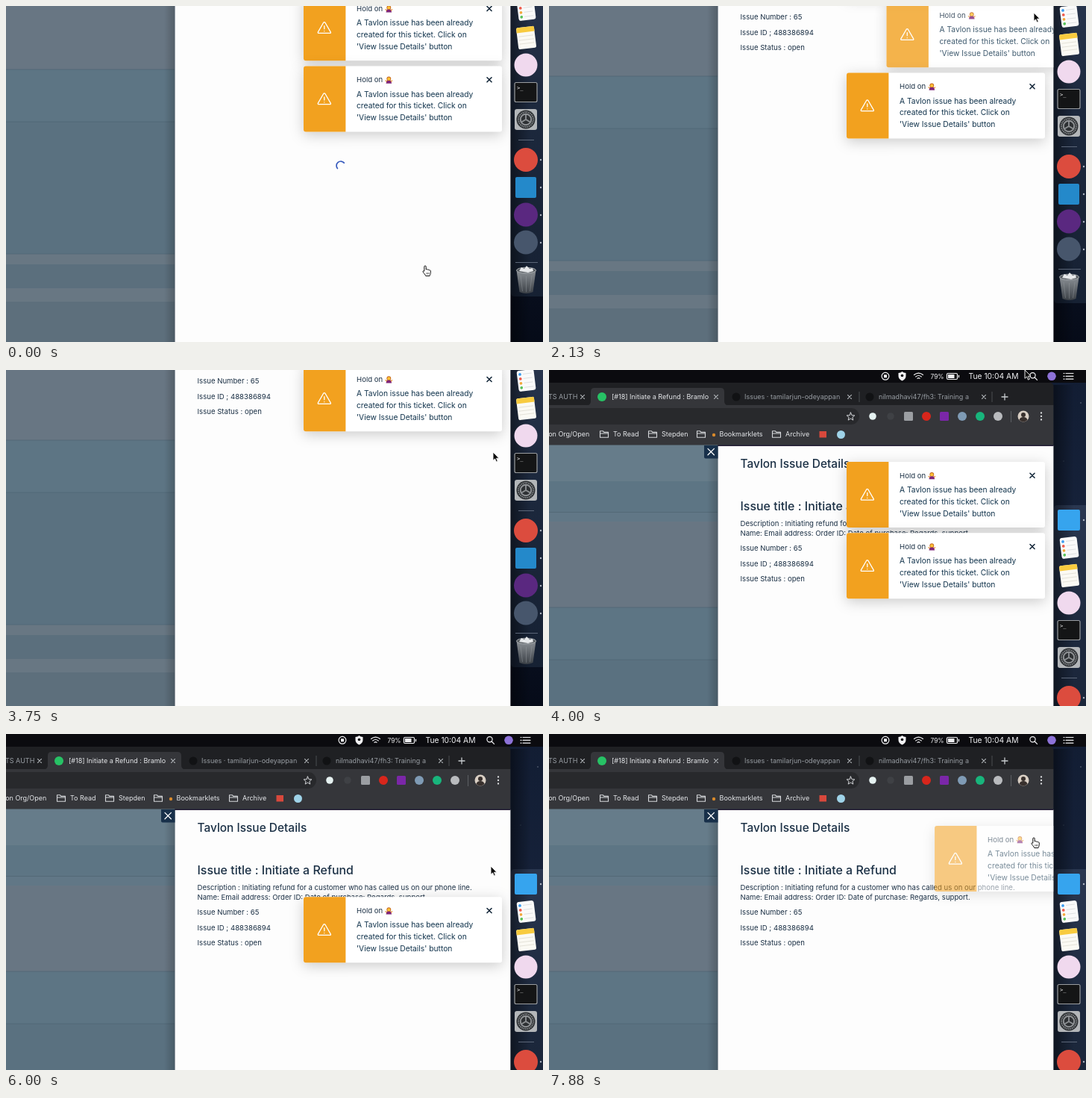
Recreate the animation shown at these times as an HTML page. Size 720 px wide and 450 px high, loop 8 s.

```html
<!DOCTYPE html>
<html lang="en">
<head>
<meta charset="utf-8">
<title>Issue details panel</title>
<style>
html, body { margin: 0; width: 100%; height: 100%; overflow: hidden; background: #060b18; }
svg { display: block; width: 720px; height: 450px; font-family: Inter, "Open Sans", sans-serif; }
text { white-space: pre; }
.body { font-size: 9.6px; fill: #1b3045; }
.note { font-size: 10.28px; fill: #12344d; }
.head { font-weight: 500; fill: #1b3045; }
.ui { font-size: 9px; fill: #e4e6e9; }
.dim { fill: #989da3; }
.line { fill: none; stroke-linecap: round; stroke-linejoin: round; }
.toast { filter: drop-shadow(0 4px 9px rgba(0, 0, 0, .2)); }
</style>
</head>
<body>
<svg viewBox="0 0 720 450">
  <defs>
    <linearGradient id="edge"><stop stop-opacity="0"/><stop offset="1" stop-opacity=".2"/></linearGradient>
    <linearGradient id="shade"><stop stop-opacity=".45"/><stop offset="1" stop-opacity="0"/></linearGradient>
    <linearGradient id="sky" x2="0" y2="1"><stop stop-color="#121d33"/><stop offset=".3" stop-color="#16223a"/><stop offset="1" stop-color="#050a17"/></linearGradient>
    <linearGradient id="dockFill" x2="0" y2="1"><stop stop-color="#2a3750"/><stop offset=".4" stop-color="#1d293e"/><stop offset="1" stop-color="#162133"/></linearGradient>
    <linearGradient id="bin" x2="0" y2="1"><stop stop-color="#8b9095"/><stop offset="1" stop-color="#3b4046"/></linearGradient>
    <clipPath id="page"><path d="M226 102H676.5V700H226z"/></clipPath>

    <path id="x" class="line" d="M-3-3 3 3M3-3-3 3"/>
    <g id="folder" class="line" stroke="#d5d7da" stroke-width="1.1">
      <path d="M-5.5-4.2h4l1.3 1.6h5.7v6.8h-11zM-5.5-1h11"/>
    </g>
    <g id="shrug">
      <circle cy="-1.6" r="2.9" fill="#c2641c"/>
      <circle cy="-1.3" r="2.1" fill="#ffc235"/>
      <path d="M-3 1h6l.8 3.8h-7.6z" fill="#7d2479"/>
      <path class="line" d="M-3 2.2-4.4.8M3 2.2 4.4.8" stroke="#e8952a" stroke-width="1.2"/>
    </g>
    <g id="toast">
      <rect width="266" height="88" rx="3" fill="#fff"/>
      <path d="M3 0H56.4V88H3a3 3 0 0 1-3-3V3a3 3 0 0 1 3-3z" fill="#f2a11f"/>
      <path class="line" d="M26.7 37 19.4 49.6Q18.8 51.2 20.5 51.2H35.1Q36.9 51.2 36.2 49.6L28.9 37Q27.8 35.600 26.7 37zM27.8 41.4v4.2M27.800 48.300v.1" stroke="#fff" stroke-width="1.3"/>
      <text class="body" x="71" y="21.6">Hold on</text>
      <use href="#shrug" x="114.3" y="18.5"/>
      <use href="#x" x="249" y="18.3" stroke="#14283a" stroke-width="1.6"/>
      <g class="note">
        <text x="71" y="41">A Tavlon issue has been already</text>
        <text x="71" y="56.8">created for this ticket. Click on</text>
        <text x="71" y="72.5">'View Issue Details' button</text>
      </g>
    </g>
  </defs>

  <g id="world">
    <!-- desktop -->
    <path d="M0 0H720V700H0z" fill="url(#sky)"/>
    <circle cx="713" cy="44" r=".7" fill="#7e8798"/>
    <circle cx="690" cy="122" r=".5" fill="#5a6478"/>

    <!-- dimmed page -->
    <path d="M0 100H226.500V700H0z" fill="#5d7584"/>
    <path d="M0 100H226V149H0z" fill="#667c8a"/>
    <path d="M0 190H226V203H0z" fill="#617786"/>
    <path d="M0 203H226V318H0z" fill="#687683"/>
    <path d="M0 388H226V565H0z" fill="#5a7180"/>
    <path d="M0 565H226V579H0zM0 611H226V629H0z" fill="#687783"/>
    <path d="M0 579H226V611H0z" fill="#5b6f7d"/>
    <path d="M0 629H226V700H0z" fill="#5d6f7c"/>
    <path d="M0 190.5H226M0 318H226M0 388H226M0 565H226" stroke="#506674" stroke-width=".8"/>
    <path d="M212 101H226.5V700H212z" fill="url(#edge)"/>

    <!-- panel -->
    <path d="M226.5 101H676.5V700H226.5z" fill="#fdfdfd"/>
    <path d="M208 101h18.5v17.5h-16.5a2 2 0 0 1-2-2z" fill="#18304a"/>
    <use href="#x" transform="translate(217.2 109.6) scale(1.4)" stroke="#fff" stroke-width=".9"/>
    <path d="M226 101.3H676.5" stroke="#2b2038" stroke-width="1.2"/>

    <g clip-path="url(#page)">
      <g id="details">
        <text class="head" x="256.5" y="131.3" font-size="15.45">Tavlon Issue Details</text>
        <text class="head" x="256.5" y="188" font-size="15.95">Issue title : Initiate a Refund</text>
        <g class="body">
          <text x="256.5" y="208.6">Description : Initiating refund for a customer who has called us on our phone line.</text>
          <text x="256.5" y="222">Name: Email address: Order ID: Date of purchase: Regards, support.</text>
          <text x="256.5" y="242.4">Issue Number : 65</text>
          <text x="256.5" y="262.6">Issue ID ; 488386894</text>
          <text x="256.5" y="283">Issue Status : open</text>
        </g>
      </g>
      <path id="spinner" class="line" d="M-4.9 3.2A5.7 5.7 0 0 1 4-4.2" stroke="#3559bd" stroke-width="1.7"/>
      <use class="toast" href="#toast"/>
      <use class="toast" href="#toast"/>
      <use class="toast" href="#toast"/>
    </g>

    <!-- browser -->
    <path d="M0 17H671.5a5 5 0 0 1 5 5V48H0z" fill="#1f2023"/>
    <path d="M0 47H676.5V100.5H0z" fill="#35363a"/>
    <path d="M0 51H405a11 11 0 0 1 0 22H0z" fill="#28292c"/>
    <path d="M50 47.5q6 0 6-6V29q0-5 5-5H230q5 0 5 5v12.5q0 6 6 6z" fill="#35363a"/>
    <path d="M416 29V43M594 29V43" stroke="#4a4c50"/>
    <g class="ui">
      <text class="dim" x="-1" y="39.3">TS AUTH</text>
      <text x="84" y="39.3">[#18] Initiate a Refund : Bramlo</text>
      <text class="dim" x="262" y="39.3">Issues · tamilarjun-odeyappan</text>
      <text class="dim" x="442" y="39.3">nilmadhavi47/fh3: Training a</text>
      <text x="-3" y="89.3">lon Org/Open</text>
      <text x="86" y="89.3">To Read</text>
      <text x="151" y="89.3">Stepden</text>
      <text x="228.5" y="89.3">Bookmarklets</text>
      <text x="317" y="89.3">Archive</text>
    </g>
    <circle cx="71" cy="36" r="6" fill="#27c265"/>
    <circle cx="251" cy="36" r="5.5" fill="#111214"/>
    <circle cx="430" cy="36" r="5.5" fill="#111214"/>
    <g id="closers" stroke="#b4b8bc" stroke-width="1.2"></g>
    <path class="line" d="M607 36h8M611 32v8" stroke="#c8cbce" stroke-width="1.3"/>
    <path class="line" d="M404.5 57l1.5 3.600 3.8.3-2.9 2.5.9 3.7-3.3-2-3.3 2 .9-3.7-2.9-2.5 3.8-.3z" stroke="#d5d7da" stroke-width="1"/>
    <g id="addons"></g>
    <path d="M619.5 55V70" stroke="#5d6064"/>
    <circle cx="636" cy="62" r="7.5" fill="#d9cfc4"/>
    <path d="M630.5 67q1-4 5.5-4t5.5 4a7.5 7.5 0 0 1-11 0z" fill="#38302d"/>
    <circle cx="636" cy="60" r="3" fill="#38302d"/>
    <path class="line" d="M660 57.500v.01M660 62v.01M660 66.5v.01" stroke="#e0e2e4" stroke-width="2.3"/>
    <g id="folders"></g>
    <circle cx="221" cy="87" r="2.2" fill="#d98a2b"/>
    <rect x="362.5" y="82" width="9.5" height="8.5" fill="#d8483c"/>
    <circle cx="391.5" cy="86.5" r="5.5" fill="#9fd3e8"/>

    <!-- menu bar -->
    <path d="M0 0H720V17H0z" fill="#0b0b0f"/>
    <g class="line" stroke="#f2f2f4" stroke-width="1.2">
      <circle cx="451" cy="8.3" r="4.9"/>
      <path d="M489.500 6.500q6-4.800 12 0M491.700 9q3.800-3 7.600 0M494 11.300q1.500-1.200 3 0"/>
      <rect x="533.5" y="4.5" width="14" height="8" rx="1.5"/>
      <path d="M549.5 7.3v2.4"/>
      <circle cx="648.5" cy="7.3" r="3.6"/><path d="M651.2 10 654.5 13.3"/>
      <path d="M690 4.5h1M693 4.5h10M690 8.3h1M693 8.3h10M690 12.1h1M693 12.1h10"/>
    </g>
    <rect x="449" y="6.3" width="4" height="4" fill="#f2f2f4"/>
    <path d="M468.5 4q3 0 5-2 2 2 5 2v4q0 4-5 6.5-5-2.5-5-6.5z" fill="#f2f2f4"/>
    <circle cx="473.5" cy="7.5" r="1.8" fill="#0b0b0f"/>
    <path d="M535 6h8.5v5H535z" fill="#f2f2f4"/>
    <circle cx="674" cy="8.3" r="5.8" fill="#8d72d8"/>
    <g fill="#f2f2f4">
      <text x="511.5" y="11.6" font-size="8.4">79%</text>
      <text x="562.5" y="12" font-size="10.3">Tue 10:04 AM</text>
    </g>

    <!-- dock -->
    <path d="M720 181H682q-5 0-5 5V617q0 5 5 5H720z" fill="url(#dockFill)"/>
    <path d="M676.5 20H704V700H676.5z" fill="url(#shade)"/>
    <path d="M687 412.5H708M683 576.5H713" stroke="#5b6678"/>
    <rect x="682" y="187" width="30" height="28" rx="2" fill="#36a4ee"/>
    <g transform="translate(697 237.5) rotate(-7)">
      <rect x="-11" y="-13.5" width="23" height="28" rx="3" fill="#fafafa"/>
      <g id="bullets"></g>
    </g>
    <g transform="translate(697.5 275) rotate(-7)">
      <rect x="-12" y="-14" width="24" height="29" rx="2" fill="#fbfaf4"/>
      <path d="M-12-7v-5q0-2 2-2h20q2 0 2 2v5z" fill="#f8cb3f"/>
      <path d="M-10-2h20M-10 3h20M-10 8h20" stroke="#dcd9ce" stroke-width=".7"/>
    </g>
    <circle cx="697" cy="312" r="15.5" fill="#f0d9ee"/>
    <rect x="682" y="335.5" width="30" height="26" rx="2" fill="#141516" stroke="#9a9da0" stroke-width="1.2"/>
    <text x="685" y="345" font-size="7" fill="#f4f4f4" font-family="'DejaVu Sans Mono', monospace">&gt;_</text>
    <rect x="682" y="371" width="30" height="28" rx="3" fill="#b3b6b9"/>
    <circle cx="697" cy="385" r="12.5" fill="#2e3134"/>
    <g fill="none" stroke="#8f9295">
      <circle cx="697" cy="385" r="10" stroke-width="1.8" stroke-dasharray="1.4 1.1"/>
      <circle cx="697" cy="385" r="7.2" stroke-width="2"/>
      <path d="M697 385V378M697 385l-6 3.5M697 385l6 3.5" stroke-width="1.8"/>
    </g>
    <circle cx="697" cy="439" r="16" fill="#dc4c3e"/>
    <rect x="683" y="462" width="28" height="28" rx="2" fill="#2489ca"/>
    <circle cx="697" cy="512.5" r="16" fill="#5a2880"/>
    <circle cx="697" cy="549.5" r="16" fill="#47566c"/>
    <path d="M684.5 587h26l-4 29q-9 4-18 0z" fill="url(#bin)"/>
    <ellipse cx="697.5" cy="587" rx="13" ry="3.8" fill="#53585d" stroke="#a4a9ad"/>
    <path d="M688 588l3-5 4 2 3-4 4 4 4-1 1 4-7 2z" fill="#e6e8ea"/>
    <path d="M690 594l2.5 21M697.5 595v21M705 594l-2.5 21" stroke="#9a9fa4" stroke-width=".7" opacity=".6"/>
    <g id="running" fill="#aeb5c1"></g>
  </g>

  <g id="cursor" stroke-linejoin="round">
    <path id="arrow" d="M0 0V11.3l2.6-2.4 1.8 4.2 1.9-.8-1.8-4.1h3.5z" fill="#0a0a0a" stroke="#fff" stroke-width=".9"/>
    <g id="hand" stroke="#111">
      <path d="M-1.2 1c0-1.4 2.4-1.4 2.4 0v4c.6-.8 2-.6 2.2.3.7-.6 1.8-.3 2 .6.9-.4 1.9 0 1.9 1.2v2.4c0 2-1 2.6-1.2 4h-5.4c-.4-1.6-2.6-3.6-3.6-5.4-.6-1.2.9-1.9 1.7-.9z" fill="#fff"/>
      <path d="M1.8 9v2.5M3.5 9v2.5M5.2 9v2.5" stroke-width=".6"/>
    </g>
  </g>
</svg>
<script>
const LOOP = 8000, STEP = 125, EXIT = 800;
const TOAST = { x: 399, y: 123, width: 266, pitch: 95.25 };
const $ = id => document.getElementById(id);
const fill = (id, items, draw) => { $(id).innerHTML = items.map(draw).join(''); };

fill('closers', [45, 224, 403, 583], x => `<use href="#x" transform="translate(${x} 36) scale(.85)"/>`);
fill('folders', [74, 139, 204, 305], x => `<use href="#folder" x="${x}" y="86"/>`);
fill('running', [201, 439, 476, 513, 550], y => `<circle cx="717" cy="${y}" r="1.2"/>`);
fill('bullets', ['#3b9cf0', '#ef5b4c', '#f3a83b', '#58c25a'], (color, i) =>
  `<circle cx="-7" cy="${i * 6 - 8.5}" r="1.9" fill="${color}"/>
   <path d="M-3 ${i * 6 - 8.5}H9" stroke="#d4d6d8" stroke-width=".7"/>`);
fill('addons', ['#e6f2f1', '#3f4145', '#9b9ea2', '#d8261c', '#7b27a8', '#7f9bb5', '#18b57c', '#b9bbbe'],
  (color, i) => {
    const x = 434 + i * 24;
    return i === 2 || i === 4
      ? `<rect x="${x - 6}" y="56" width="12" height="12" rx="1.5" fill="${color}"/>`
      : `<circle cx="${x}" cy="62" r="${i < 2 ? 4.8 : 6}" fill="${color}"/>`;
  });

// Each key is [time, ...values].
const scrollKeys = [[875, 233], [1125, 225], [1250, 224], [3750, 224], [4000, 0]];
const cursorKeys = [
  [0, 562, 348], [125, 562, 348], [875, 651, 4], [1125, 651, 0], [1875, 651, 4], [2125, 650, 9],
  [2250, 650, 12], [2625, 650, 103], [3500, 652, 110], [3750, 653, 110], [4000, 638, 0],
  [4500, 638, 0], [5000, 649, 137], [5500, 649, 138], [6000, 650, 177], [6375, 650, 178], [6750, 650, 139]
];
const handTimes = [[0, 250], [875, 2000], [2600, 2800], [5000, 5400], [6750, LOOP]];

// Each toast has [time, slot] places and the time it starts to leave.
const toasts = [
  { places: [[0, 0]], leave: 5270 },
  { places: [[0, 1]], leave: 1999 },
  { places: [[0, 2], [2800, 1], [6100, 0]], leave: 7662 }
];
const toastNodes = document.querySelectorAll('.toast');

function track(keys, t) {
  const next = keys.findIndex(key => key[0] > t);
  if (next < 0) return keys[keys.length - 1].slice(1);
  if (next === 0) return keys[0].slice(1);
  const a = keys[next - 1], b = keys[next], p = (t - a[0]) / (b[0] - a[0]);
  return a.slice(1).map((v, i) => v + (b[i + 1] - v) * p);
}

// The CSS "ease" curve: cubic-bezier(.25, .1, .25, 1).
function ease(p) {
  if (p <= 0 || p >= 1) return p <= 0 ? 0 : 1;
  let lo = 0, hi = 1;
  for (let i = 0; i < 18; i++) {
    const u = (lo + hi) / 2;
    if (.75 * u * (1 - u) + u ** 3 < p) lo = u; else hi = u;
  }
  return .3 * lo * (1 - lo) ** 2 + 3 * (1 - lo) * lo * lo + lo ** 3;
}

const place = (node, x, y, more = '') => node.setAttribute('transform', `translate(${x} ${y}) ${more}`);
const show = (node, on) => { node.style.display = on ? '' : 'none'; };

function draw(t) {
  place($('world'), 0, -track(scrollKeys, t)[0]);

  const loading = t < 500;
  show($('details'), !loading);
  show($('spinner'), loading);
  place($('spinner'), 449.3, 447.3, `rotate(${t * .45})`);

  toasts.forEach(({ places, leave }, i) => {
    const gone = ease((t - leave) / EXIT);
    const slot = places.filter(([from]) => from <= t).pop()[1];
    place(toastNodes[i], TOAST.x + TOAST.width * gone, TOAST.y + TOAST.pitch * slot);
    toastNodes[i].style.opacity = 1 - gone;
    show(toastNodes[i], gone < 1);
  });

  const hand = handTimes.some(([from, to]) => t >= from && t < to);
  place($('cursor'), ...track(cursorKeys, t));
  show($('hand'), hand);
  show($('arrow'), !hand);
}

function tick() {
  const t = performance.now() % LOOP;
  draw(Math.floor((t + 5) / STEP) * STEP % LOOP);
  requestAnimationFrame(tick);
}
tick();
</script>
</body>
</html>
```
